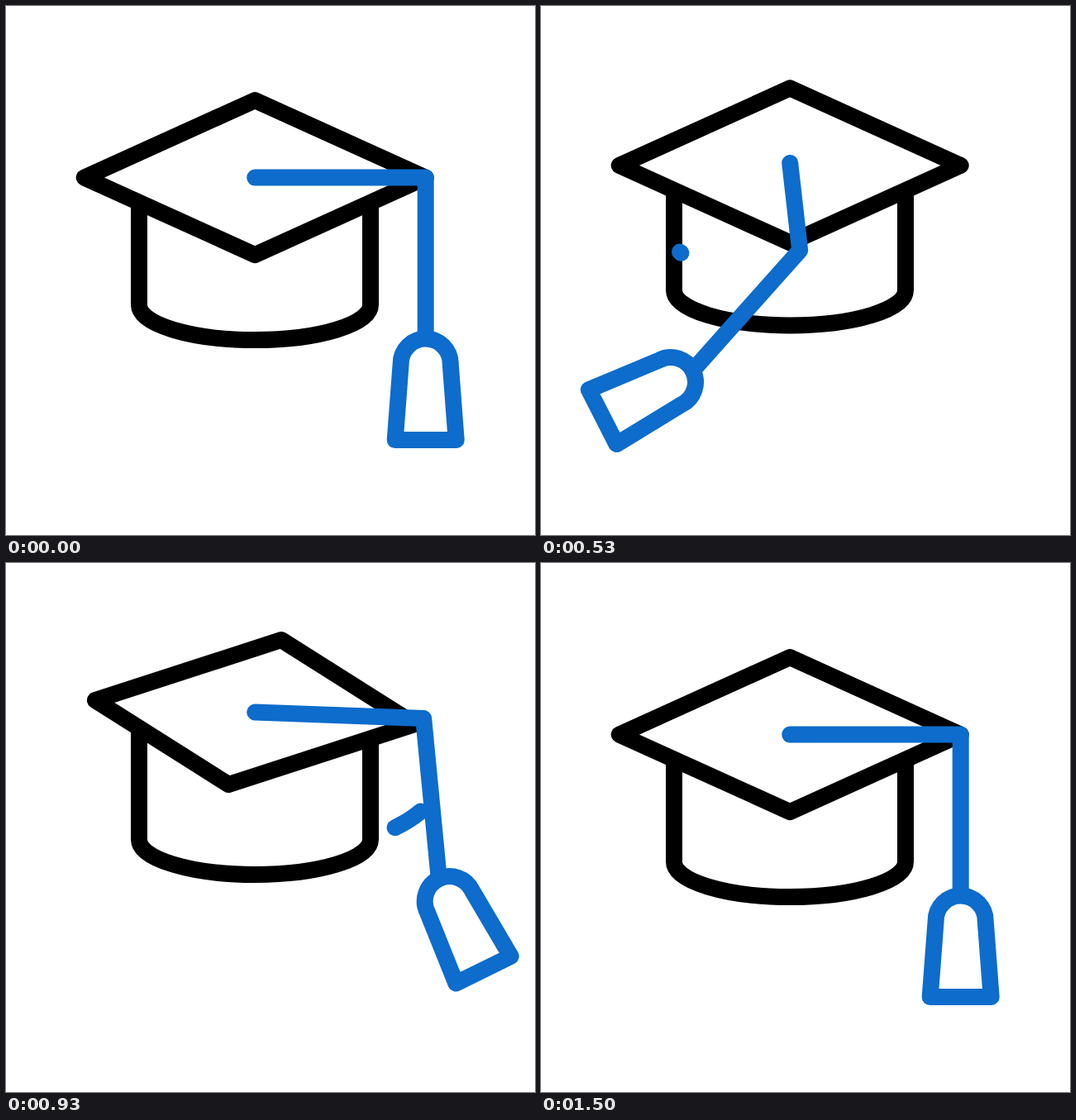
Animation of 640x640 px, one loop 1.67 s. Source, as an HTML page:

```html
<!DOCTYPE html>
<html>
<head>
<meta charset="utf-8">
<title>Graduation cap</title>
<style>
  html, body { margin: 0; height: 100%; overflow: hidden; background: #fff; }
  svg { display: block; width: 100vw; height: 100vh; }
  path { fill: none; stroke-width: 20; stroke-linecap: round; stroke-linejoin: round; }
  .cap { stroke: #000; }
  .tassel { stroke: #0d6ccc; }
</style>
</head>
<body>
<svg viewBox="0 0 640 640">
  <path class="cap" id="body" style="stroke-linecap:butt" d="M161 10V154A140 42.5 0 0 0 441 154V10"/>
  <path class="cap" id="board" style="fill:#fff"/>
  <path class="tassel" id="swoosh"/>
  <path class="tassel" id="cord"/>
  <path class="tassel" id="bell" d="M-37 121.5L-30 29A30 30 0 0 1 30 29L37 121.5Z"/>
</svg>
<script>
const LOOP = 1670, FPS = 30;
const CX = 301.2, CY = 207.6, RX = 206.5, RY = 93.5, CORD = 196;
const { sin, cos, sqrt, PI } = Math;
const rad = degrees => degrees * PI / 180;
const el = id => document.getElementById(id);

const ramp = (k, from, to) => Math.min(1, Math.max(0, (k - from) / (to - from)));
const smooth = u => u * u * (3 - 2 * u);
const easeOut = u => 1 - (1 - u) ** 1.5;
const softStart = u => .4 * u + .6 * smooth(u);

// A value built from eased shifts: [start, end, amount, ease].
const moves = (...shifts) => k => shifts.reduce((sum, [from, to, amount, ease = smooth]) =>
  sum + amount * ease(ramp(k, from, to)), 0);

const lift = moves([0, 10, 50.3, easeOut], [10, 20, -50.3], [19.5, 32.5, 37.5], [32.5, 45, -37.5]);
const turn = moves([0, 16, 90, softStart], [16, 31, -90]);
const cordTurn = moves([0, 4, -5.5], [4, 17, 48], [16, 26, -48], [28, 32, 5.5]);
const bellTurn = moves([0, 7, -28], [7, 16.6, 92], [17, 29, -92], [28, 32, 28]);

// Corners travel along two straight chords of the circle that meet at the knee.
function cornerRadius(angle, knee) {
  const [a, b] = angle < knee ? [0, knee] : [knee, 90];
  return cos(rad((b - a) / 2)) / cos(rad(angle - (a + b) / 2));
}

const swooshes = [
  { x0: 476, x1: 126, head: [0, 10], tail: [3, 14.5], cx: 301, cy: 232.5, rx: 187, ry: 76 },
  { x0: 168, x1: 503, head: [15.5, 28.5], tail: [17.5, 30.5], cx: 336.5, cy: 255, rx: 190, ry: 92 }
];

function swooshPath(k) {
  const s = swooshes.find(s => k > s.head[0] && k < s.tail[1]);
  if (!s) return "";
  const xAt = span => s.x0 + (s.x1 - s.x0) * smooth(ramp(k, ...span));
  const point = x => `${x} ${s.cy + s.ry * sqrt(1 - ((x - s.cx) / s.rx) ** 2)}`;
  const [left, right] = [xAt(s.head), xAt(s.tail)].sort((a, b) => a - b);
  return `M${point(left)}A${s.rx} ${s.ry} 0 0 0 ${point(right)}`;
}

function draw(k) {
  const y = CY - lift(k), angle = turn(k);
  el("body").setAttribute("transform", `translate(0 ${y})`);

  const r = cornerRadius(angle, k < 16 ? 51 : 45), sag = 3 * (angle / 90) ** 2;
  const corners = [0, 90, 180, 270].map(a =>
    `${CX + RX * r * cos(rad(a + angle))} ${y + sag + RY * r * sin(rad(a + angle))}`);
  el("board").setAttribute("d", `M${corners.join("L")}Z`);
  el("swoosh").setAttribute("d", swooshPath(k));

  // The tassel runs slightly ahead of the board on the way out.
  const lead = 4.5 * sin(PI * ramp(k, 0, 16));
  const tx = CX + RX * cos(rad(.963 * angle + lead));
  const ty = y + 1.13 * RY * sin(rad(angle)) ** 1.45;
  const swing = rad(cordTurn(k));
  const along = length => `${tx - length * sin(swing)} ${ty + length * cos(swing)}`;
  el("cord").setAttribute("d", `M${CX} ${y}L${tx} ${ty}L${along(CORD - 6)}`);
  el("bell").setAttribute("transform", `translate(${along(CORD)}) rotate(${bellTurn(k)})`);
}

const start = performance.now();
function tick() {
  const t = (performance.now() - start) % LOOP;
  draw(Math.floor((t + 4) * FPS / 1000)); // steps at 30 per second
  requestAnimationFrame(tick);
}
tick();
</script>
</body>
</html>
```
